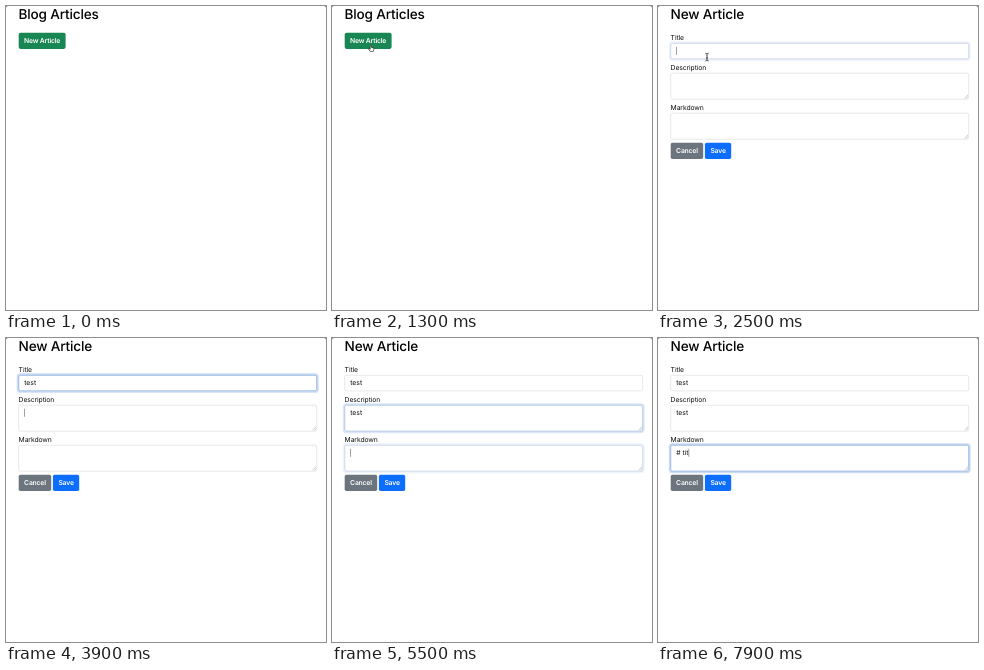
Recreate the animation shown at these times as an HTML page. Size 320x304 px, loop 8 s.

```html
<!DOCTYPE html>
<html lang="en">
<head>
<meta charset="utf-8">
<title>Blog Articles</title>
<style>
  html, body { margin: 0; width: 100%; height: 100%; overflow: hidden; background: #fff; }
  svg { display: block; width: 320px; height: 304px; }
  text { font: 6.8px Inter, "Open Sans", sans-serif; fill: #0c0e10; white-space: pre; text-rendering: geometricPrecision; }
  .head { font-size: 13.6px; font-weight: 500; letter-spacing: -.18px; fill: #000; }
  .label { letter-spacing: -.1px; }
  .btn text { fill: #fff; font-weight: 600; letter-spacing: -.19px; }
  .box { fill: #fff; stroke: #dde0e3; stroke-width: .75; }
  .line { fill: none; stroke: #9dbce8; stroke-width: .9; }
  .ring { fill: none; stroke: #6f9fe6; stroke-opacity: .36; stroke-width: 1.7; }
  .grip { fill: none; stroke: #888; stroke-width: .45; }
</style>
</head>
<body>
<svg viewBox="0 0 320 304">
  <path d="M0 0H1.6L0 1.6ZM320 0H318.4L320 1.6Z" fill="#888"/>
  <g id="list">
    <text class="head" x="12.6" y="13.2">Blog Articles</text>
  </g>
  <g id="form">
    <text class="head" x="12.6" y="13.2">New Article</text>
  </g>
  <rect id="caret" width=".7" height="8" fill="#777"/>
  <g id="arrow">
    <path d="M0 0V7.2L1.7 5.7 2.8 8.2 4 7.7 2.9 5.2H5.2Z" fill="#111" stroke="#fff" stroke-width=".6"/>
  </g>
  <g id="hand">
    <path d="M-.6 .2Q0-.5 .6 .2V2.1L2.6 2.6Q3.3 2.9 3.1 3.8L2.5 6.1H-.7L-2.2 3.8Q-2.2 3-1.5 3.3L-.6 4Z" fill="#fff" stroke="#111" stroke-width=".6"/>
  </g>
  <g id="beam">
    <path d="M-1.6-3.7Q0-3.7 0-2.7Q0-3.7 1.6-3.7M0-2.7V2.9M-1.6 3.9Q0 3.9 0 2.9Q0 3.9 1.6 3.9M-.8 .9H.8" fill="none" stroke="#222" stroke-width=".8"/>
  </g>
</svg>
<script>
const LOOP = 8000, STEP = 100, OPEN = 1400, HIDE = 2800;
const $ = id => document.getElementById(id);
const clamp = v => Math.max(0, Math.min(1, v));
const ease = v => v * v * (3 - 2 * v);

function add(parent, tag, attrs, content = '') {
  const el = document.createElementNS('http://www.w3.org/2000/svg', tag);
  for (const key in attrs) el.setAttribute(key, attrs[key]);
  el.textContent = content;
  return parent.appendChild(el);
}

function button(parent, x, y, w, fill, label) {
  const g = add(parent, 'g', { class: 'btn' });
  add(g, 'rect', { x, y, width: w, height: 16.2, rx: 1.8, fill });
  add(g, 'text', { x: x + w / 2, y: y + 10.6, 'text-anchor': 'middle' }, label);
}

function field(label, y, h, focus, blur, keys) {
  const form = $('form');
  const rect = (cls, parent, pad) => add(parent, 'rect', {
    class: cls, x: 12.7 - pad, y: y - pad, width: 298 + 2 * pad, height: h + 2 * pad, rx: 1.7 + pad
  });
  add(form, 'text', { class: 'label', x: 12.6, y: y - 3.2 }, label);
  rect('box', form, 0);
  const glow = add(form, 'g', {});
  rect('ring', glow, 1.1);
  rect('line', glow, 0);
  if (h > 20) {
    const b = y + h - 1;
    add(form, 'path', { class: 'grip', d: `M306.6 ${b}l3.4-3.4M308.6 ${b}l1.4-1.4` });
  }
  const text = add(form, 'text', { x: 18.2, y: y + 10.1 });
  return { y, focus, blur, keys, glow, text };
}

button($('list'), 12.7, 26.7, 46.9, '#198754', 'New Article');
const fields = [
  field('Title', 37.3, 15.6, 2400, 3900, [[3300, 't'], [3400, 'te'], [3700, 'test']]),
  field('Description', 67.2, 26, 3900, 5400, [[4400, 't'], [4600, 'te'], [4700, 'tes'], [5100, 'test']]),
  field('Markdown', 107.2, 26, 5400, LOOP * 2,
    [[6900, '#'], [7400, '#\u00a0'], [7600, '#\u00a0t'], [7800, '#\u00a0ti'], [7900, '#\u00a0tit']])
];
button($('form'), 12.7, 136.8, 32.5, '#6c757d', 'Cancel');
button($('form'), 46.9, 136.8, 26.3, '#0d6efd', 'Save');

const blinks = [[3000, 3300], [5900, 6400]];
// time, x, y of the pointer
const path = [[100, 110, 216], [900, 28, 38], [1100, 38.8, 38.8], [1400, 38.8, 39.5], [2100, 49, 51]];

function pointerAt(t) {
  const i = path.findIndex(p => p[0] > t);
  if (i < 0) return path[path.length - 1].slice(1);
  const a = path[Math.max(0, i - 1)], b = path[i];
  const k = ease(clamp((t - a[0]) / (b[0] - a[0])));
  return [a[1] + (b[1] - a[1]) * k, a[2] + (b[2] - a[2]) * k];
}

const show = (el, on) => el.style.display = on ? '' : 'none';
const ramp = (t, start) => ease(clamp((t - start - 50) / 130));

function draw(t) {
  show($('list'), t < OPEN);
  show($('form'), t >= OPEN);

  show($('caret'), t >= fields[0].focus && !blinks.some(([a, b]) => t >= a && t < b));
  for (const f of fields) {
    f.glow.style.opacity = ramp(t, f.focus) - ramp(t, f.blur);
    f.text.textContent = f.keys.reduce((s, [at, value]) => t >= at ? value : s, '');
    if (t >= f.focus && t < f.blur) {
      const w = f.text.textContent ? f.text.getComputedTextLength() : 0;
      $('caret').setAttribute('x', 18.2 + w);
      $('caret').setAttribute('y', f.y + 3.6);
    }
  }

  const [x, y] = pointerAt(t);
  const onButton = x > 13 && x < 59 && y > 27 && y < 43;
  const kind = t >= OPEN ? 'beam' : onButton ? 'hand' : 'arrow';
  for (const id of ['arrow', 'hand', 'beam']) {
    show($(id), id === kind && t >= path[0][0] && t < HIDE);
    $(id).setAttribute('transform', `translate(${x} ${y})`);
  }
}

const start = performance.now();
function tick(now) {
  const t = Math.max(0, now - start) % LOOP;
  draw(Math.floor(t / STEP) * STEP);
  requestAnimationFrame(tick);
}
draw(0);
requestAnimationFrame(tick);
</script>
</body>
</html>
```
